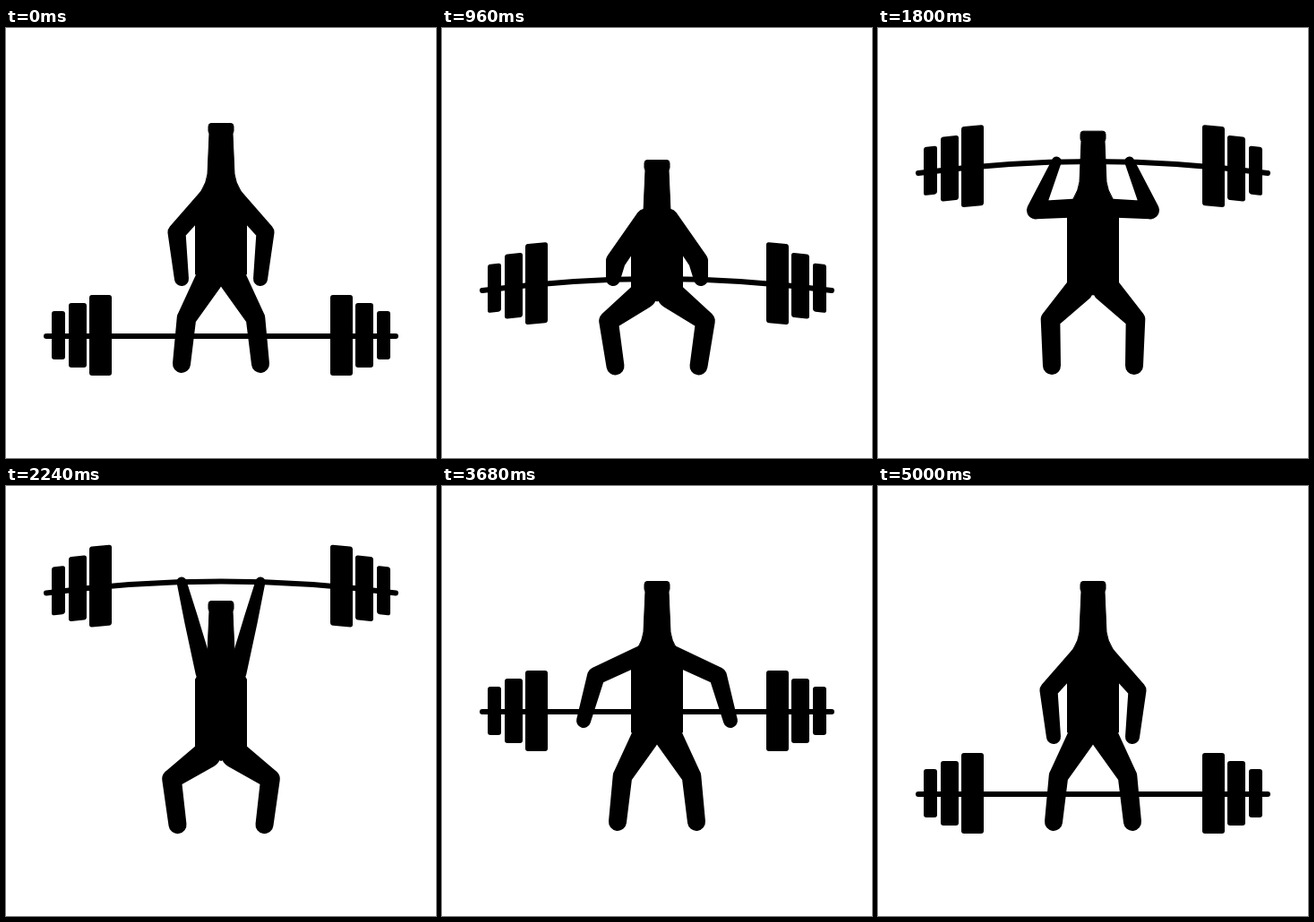
An HTML page for the animation above (5040 ms loop, 480x480 px).

```html
<!DOCTYPE html>
<html lang="en">
<head>
<meta charset="utf-8">
<title>Bottle weightlifter</title>
<style>
  html, body { margin: 0; width: 100%; height: 100%; overflow: hidden; background: #fff; }
  svg { display: block; width: 100vw; height: 100vh; }
</style>
</head>
<body>
<svg viewBox="0 0 480 480">
  <path id="bar" fill="none" stroke="#000" stroke-width="6" stroke-linecap="round"/>
  <g id="plates"></g>
  <path id="bottle" stroke="#000" stroke-width="1" stroke-linejoin="round"/>
  <path id="left"/>
  <path id="right" transform="matrix(-1 0 0 1 480 0)"/>
</svg>
<script>
const LOOP = 5040, STEP = 40, FLOOR = 344;
const $ = id => document.getElementById(id);

// Left half of the body; the right half is mirrored.
// legs: hip, knee, foot (x, y)
const upright = [226.5, 281, 201.5, 324, 196, 375];
const hinged = [225.5, 286, 201.5, 324, 196, 375];
const deep = [224.5, 298, 186, 327, 193.5, 377.5];
const half = [224.5, 296, 188, 326, 193, 378];
const split = [224.5, 299.5, 185, 327, 191.5, 378];

// arms: shoulder (x, y), elbow (x, y, r), hand (x, y, r)
const hang = [228, 186, 190.5, 228, 10, 196, 280, 8];
const reach = [224, 236, 150.5, 285, 9.5, 193, 335, 8];
const overhead = [222, 192, 207, 135, 8, 196, 91, 6];

const pose = (t, head, arm, leg) => [t, head, ...arm, ...leg];
const body = [
  pose(0, 106, hang, upright),
  pose(400, 172, reach, hinged),
  pose(520, 172, reach, hinged),
  pose(640, 167, [224, 232, 158, 283, 10, 192, 339, 8], hinged),
  pose(960, 147, [227, 212, 194, 260, 11, 191, 280, 8], deep),
  pose(1280, 118, [226, 207, 175, 218, 10, 201, 168, 5.5], half),
  pose(1640, 106, [226, 192, 174, 198, 10, 200, 143, 5.5], upright),
  pose(1880, 119, [226, 205, 177, 206, 10, 199, 152, 5.5], half),
  pose(2240, 128, [222, 208, 207, 150, 8, 196, 107, 5.5], split),
  pose(2600, 106, overhead, upright),
  pose(3240, 106, overhead, upright),
  pose(3480, 106, [226, 189, 176, 172, 9, 146, 128, 7], upright),
  pose(3680, 106, [228, 186, 172, 212, 10, 158, 262, 8], upright),
  pose(3920, 106, hang, upright)
];

// time, height of the bar's middle, droop of its ends
const lift = [
  [0, FLOOR, 0], [520, FLOOR, 0], [640, 340, 13], [960, 280, 13],
  [1280, 170, 13], [1640, 143, 13], [1880, 152, 13],
  [2240, 106.5, 13], [2600, 88.5, 13]
];

// bounces: start, end, height
const bounces = [[3790, 4410, 79.6], [4410, 4770, 24], [4770, 4990, 8]];

const disks = [[105.5, 25, 90], [80, 20, 72], [58.5, 15, 54]];
const plates = [];
for (const side of [-1, 1]) {
  for (const [x, w, h] of disks) {
    const el = document.createElementNS("http://www.w3.org/2000/svg", "rect");
    const set = { x: -w / 2, y: -h / 2, width: w, height: h, rx: 3 };
    for (const k in set) el.setAttribute(k, set[k]);
    $("plates").append(el);
    plates.push({ el, x: 240 + side * (240 - x) });
  }
}

const clamp = v => Math.max(0, Math.min(1, v));
const smooth = u => u * u * (3 - 2 * u);

function sample(keys, t) {
  const next = keys.findIndex(k => k[0] > t);
  if (next < 0) return keys[keys.length - 1].slice(1);
  const a = keys[next - 1], b = keys[next];
  let u = (t - a[0]) / (b[0] - a[0]);
  if (next === 1) u = smooth(u);
  return a.map((v, i) => v + (b[i] - v) * u).slice(1);
}

// Outline around two circles joined by their tangents
function limb(ax, ay, ar, bx, by, br) {
  const dir = Math.atan2(by - ay, bx - ax);
  const phi = Math.acos((ar - br) / Math.hypot(bx - ax, by - ay));
  const at = (x, y, r, a) =>
    (x + r * Math.cos(a)).toFixed(2) + " " + (y + r * Math.sin(a)).toFixed(2);
  const arc = (r, big) => `A${r} ${r} 0 ${big ? 1 : 0} 1 `;
  return "M" + at(ax, ay, ar, dir + phi) + arc(ar, ar > br) + at(ax, ay, ar, dir - phi) +
    "L" + at(bx, by, br, dir - phi) + arc(br, br > ar) + at(bx, by, br, dir + phi) + "Z";
}

function barAt(t) {
  if (t < 3240) return sample(lift, t);
  const droop = 13 * (1 - clamp((t - 3270) / 130));
  if (t < 3790) return [88.5 + (FLOOR - 88.5) * ((t - 3240) / 550) ** 2, droop];
  const hop = bounces.find(b => t < b[1]);
  if (!hop) return [FLOOR, 0];
  const u = (t - hop[0]) / (hop[1] - hop[0]);
  return [FLOOR - hop[2] * 4 * u * (1 - u), 0];
}

function drawBar(t) {
  const [y, droop] = barAt(t);
  $("bar").setAttribute("d", `M45 ${y + droop}Q240 ${y - droop} 435 ${y + droop}`);
  for (const { el, x } of plates) {
    const u = (x - 240) / 195;
    const tilt = Math.atan(2 * droop * u / 195) * 180 / Math.PI;
    el.setAttribute("transform", `translate(${x} ${y - 1 + droop * u * u}) skewY(${tilt})`);
  }
}

function drawBody(t) {
  const [h, sx, sy, ex, ey, er, hx, hy, hr, px, py, kx, ky, fx, fy] = sample(body, t);
  const hem = py - 6;
  $("bottle").setAttribute("d",
    `M229 ${h + .5}H251Q254 ${h + .5} 254 ${h + 4}V${h + 9}L253 ${h + 12}L255 ${h + 57}` +
    `Q256 ${h + 66} 262 ${h + 76}L268.5 ${h + 88}V${hem}L240 ${hem + 13}L211.5 ${hem}V${h + 88}` +
    `L218 ${h + 76}Q224 ${h + 66} 225 ${h + 57}L227 ${h + 12}L226 ${h + 9}V${h + 4}Q226 ${h + .5} 229 ${h + .5}Z`);
  const half = limb(sx, sy, 10.5, ex, ey, er) + limb(ex, ey, er, hx, hy, hr) +
    limb(px, py, 15.5, kx, ky, 10.8) + limb(kx, ky, 10.8, fx, fy, 10);
  $("left").setAttribute("d", half);
  $("right").setAttribute("d", half);
}

function frame() {
  const t = Math.floor(performance.now() % LOOP / STEP) * STEP;
  drawBar(t);
  drawBody(t);
  requestAnimationFrame(frame);
}
frame();
</script>
</body>
</html>
```
